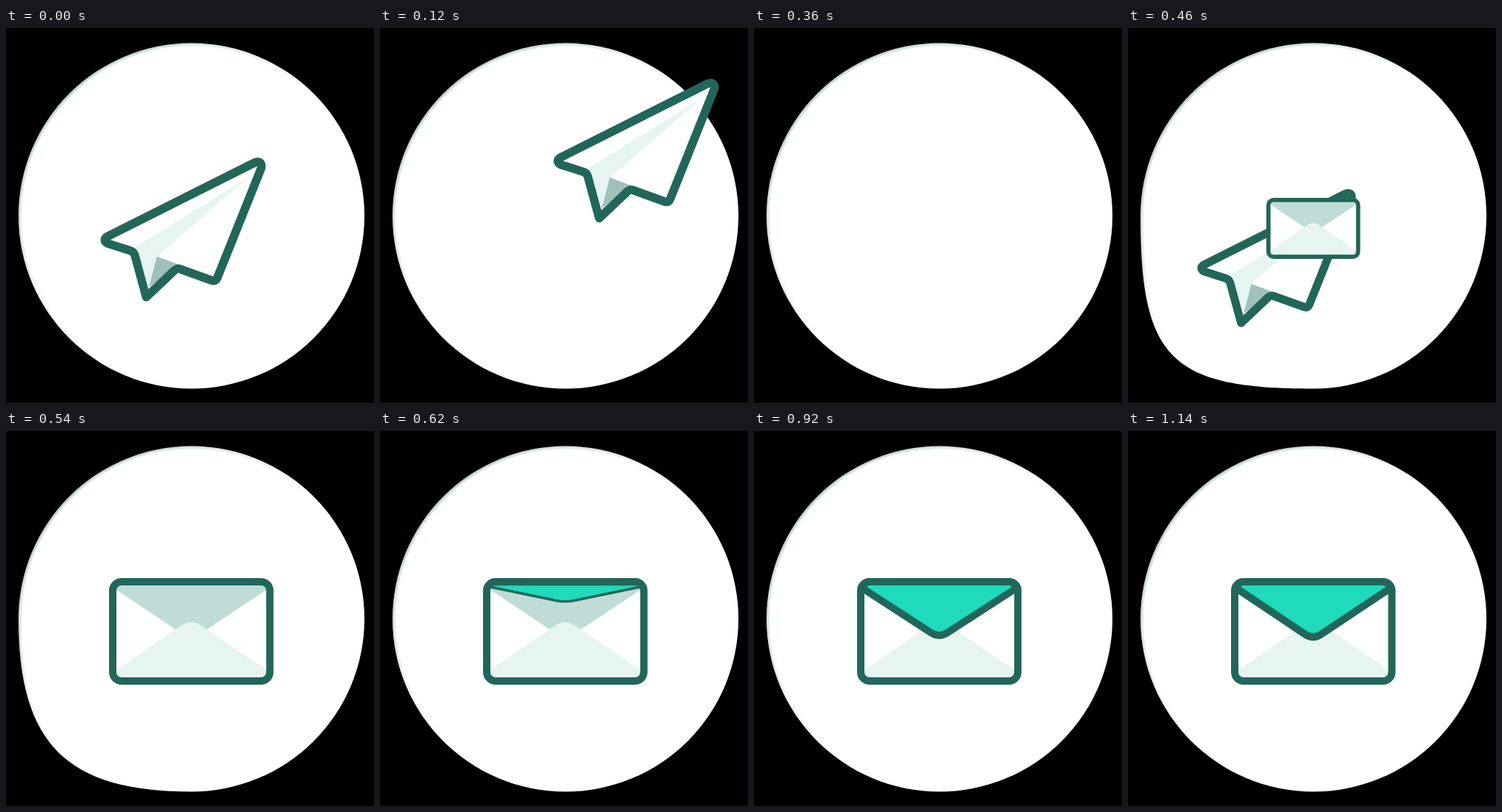
An HTML page with a canvas that plays this animation: 500x510 px, repeating every 1.44 s.

```html
<!DOCTYPE html>
<html lang="en">
<head>
<meta charset="utf-8">
<title>Paper plane to envelope</title>
<style>
html, body { margin: 0; height: 100%; overflow: hidden; background: #000; }
canvas { display: block; }
</style>
</head>
<body>
<canvas id="stage" width="500" height="510"></canvas>
<script>
const ctx = document.getElementById('stage').getContext('2d');
const LOOP = 1440, STEP = 20, LAST = 1140;
const DARK = '#22665a', PALE = '#e6f5f1', TEAL = '#1fdabb', MINT = '#80fce2';

const plane = new Path2D('M137 284L339 182.5Q348 180 347 190L287 340Q285 345 280 343.5L237 328Q233 326 229 329.5L190.5 366L175 309Q173.5 304 168 302.5L138 293Q131 289 137 284Z');
const planeFold = new Path2D('M172 300L330 202.5L205 311L195 354L181 309Z');
const planeShade = new Path2D('M205 310.5L234 321.5L194 353Z');
const body = new Path2D();
body.roundRect(145, 205, 213.5, 135, 12);
const inside = new Path2D('M147 214L155 207H348L357 214L251.5 284Z');
const front = new Path2D('M147 327L236 266Q251.5 254 267 266L357 327L352 338H152Z');
const flap = new Path2D('M146 213Q150 205 158 205H345.5Q353.5 205 357.5 213L263 276Q251.5 284 240 276Z');
const rayAngles = [0, 51.5, 103.4, 155.2, 205.5, 257.7, 310];

const progress = (t, start, length) => Math.min(1, Math.max(0, (t - start) / length));
const easeOut = p => 1 - (1 - p) ** 2;

function fill(path, color) {
  ctx.fillStyle = color;
  ctx.fill(path);
}

function outline(path, width, color = DARK) {
  ctx.lineWidth = width;
  ctx.strokeStyle = color;
  ctx.stroke(path);
}

// Runs draw scaled around (x, y), then moved by (dx, dy).
function transformed(x, y, sx, sy, dx, dy, draw) {
  ctx.save();
  ctx.translate(x + dx, y + dy);
  ctx.scale(sx, sy);
  ctx.translate(-x, -y);
  draw();
  ctx.restore();
}

const rim = ctx.createLinearGradient(86, 90, 252, 256);
rim.addColorStop(0, 'rgba(34,102,90,.16)');
rim.addColorStop(1, 'rgba(34,102,90,0)');

function drawDisc(t) {
  const handle = 129.8 + 68 * Math.sin(Math.PI * progress(t, 380, 200));
  const disc = new Path2D();
  disc.arc(252, 255.5, 235, Math.PI, Math.PI * 2.5);
  disc.bezierCurveTo(252 - handle, 490.5, 17, 255.5 + handle, 17, 255.5);
  fill(disc, '#fff');
  ctx.save();
  ctx.clip(disc);
  outline(disc, 4, rim);
  outline(disc, 8, rim);
  ctx.restore();
}

function drawPlane(t) {
  let shift = 0.894 * t, scale = 1;
  if (t >= 360) {
    shift = -380 * (1 - progress(t, 360, 147)) ** 2;
    scale = 1 - progress(t, 440, 100) ** 2;
  }
  if (scale <= 0) return;
  transformed(241, 274, scale, scale, shift, -shift, () => {
    fill(plane, '#fff');
    fill(planeFold, PALE);
    fill(planeShade, '#a0c1bb');
    outline(plane, 11.5);
  });
}

function drawRays(t) {
  const reach = time => 110 + 100 * easeOut(progress(time, 640, 100));
  const inner = reach(t - 42), outer = reach(t);
  if (outer - inner < 0.1) return;
  for (const angle of rayAngles) {
    ctx.save();
    ctx.translate(251, 257);
    ctx.rotate(angle * Math.PI / 180);
    outline(new Path2D(`M0 ${-inner}V${-outer}`), 7, MINT);
    ctx.restore();
  }
}

function drawEnvelope(t) {
  const scale = easeOut(progress(t, 420, 116));
  if (!scale) return;
  transformed(251.7, 272.5, scale, scale, 0, 0, () => {
    fill(body, '#fff');
    fill(inside, '#c0dcd6');
    fill(front, PALE);
    outline(body, 10);
    const age = t - 595;
    if (age <= 0) return;
    const open = 1 - Math.exp(-0.01056 * age) * Math.cos(Math.PI * age / 175);
    transformed(251.7, 210.5, 1, open, 0, 0, () => {
      fill(flap, TEAL);
      outline(flap, 10);
    });
  });
}

function render(now) {
  const t = Math.min(LAST, Math.floor(now % LOOP / STEP) * STEP);
  ctx.clearRect(0, 0, 500, 510);
  ctx.lineJoin = ctx.lineCap = 'round';
  drawDisc(t);
  drawPlane(t);
  drawRays(t);
  drawEnvelope(t);
}

const start = performance.now();
function tick() {
  render(performance.now() - start);
  requestAnimationFrame(tick);
}
tick();
</script>
</body>
</html>
```
